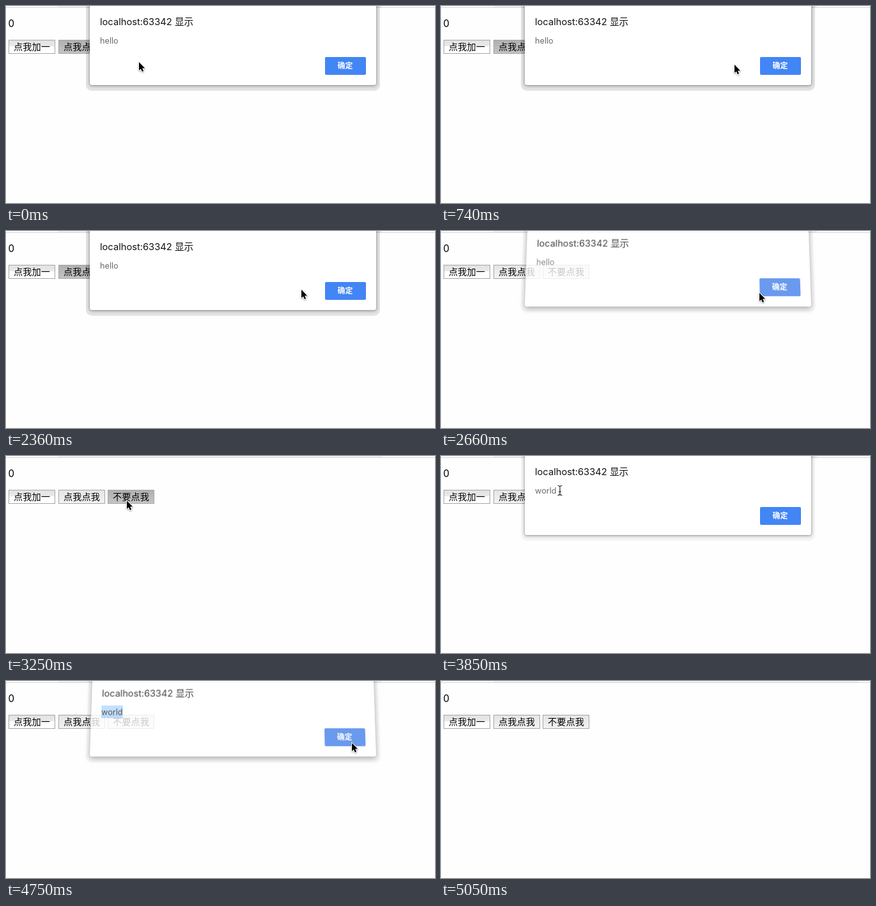
An HTML page for the animation above (5490 ms loop, 671 by 309 pixels).

```html
<!DOCTYPE html>
<html lang="zh-CN">
<head>
<meta charset="utf-8">
<title>Alert dialogs</title>
<style>
  html, body { margin: 0; width: 100%; height: 100%; overflow: hidden; background: #fefefe; }
  svg { position: absolute; left: 0; top: 0; overflow: visible; }
  text { font-family: "Noto Sans CJK SC", "Noto Sans CJK", sans-serif; }
  .latin { font-family: Inter, Roboto, sans-serif; }
  #dialog { position: absolute; left: 0; top: 0; width: 671px; height: 124px; transform-origin: 355px 124px; }
  #panel { position: absolute; left: 131px; top: -30px; width: 448px; height: 154px; border-radius: 3px;
    background: #fff; box-shadow: 0 0 1px rgba(0,0,0,.5), 0 1px 5px rgba(0,0,0,.42); }
  #ring { position: absolute; left: 125px; top: -30px; width: 460px; height: 163px; border-radius: 9px;
    background: rgba(0,0,0,.035); }
  .strong #ring { background: rgba(0,0,0,.1); }
  .moving #panel { box-shadow: 0 0 1px rgba(0,0,0,.4), 0 3px 8px rgba(0,0,0,.4); }
  .moving { opacity: .79; transform: translateY(-5.5px) perspective(300px) rotateX(2.6deg) scaleY(1.015); }
</style>
</head>
<body>
<svg width="671" height="309">
  <defs>
    <linearGradient id="split" x2="0" y2="1">
      <stop offset="0" stop-color="#e2e2e2"/><stop offset=".44" stop-color="#e9e9e9"/>
      <stop offset=".44" stop-color="#fefefe"/><stop offset="1" stop-color="#fff"/>
    </linearGradient>
    <linearGradient id="idle" x2="0" y2="1">
      <stop offset="0" stop-color="#e4e4e4"/><stop offset="1" stop-color="#f3f3f3"/>
    </linearGradient>
    <linearGradient id="down" x2="0" y2="1">
      <stop offset="0" stop-color="#afafaf"/><stop offset="1" stop-color="#c4c4c4"/>
    </linearGradient>
  </defs>
  <rect id="strip" x="82" height="2" fill="#f0f0f0"/>
  <rect y="2" width="671" height="1" fill="#d4d4d4"/>
  <text class="latin" x="3.6" y="33" font-size="15.2">0</text>
  <g id="buttons" font-size="14.2"></g>
</svg>

<div id="dialog">
  <div id="ring"></div>
  <div id="panel"></div>
  <svg width="671" height="124">
    <text class="latin" x="147" y="30" font-size="14.7" fill="#111">localhost:63342</text>
    <text x="264" y="30" font-size="14.6" fill="#111">显示</text>
    <rect id="mark" y="44" height="20" fill="#b3d7ff"/>
    <text id="message" class="latin" x="147" y="59" font-size="12.7"></text>
    <rect id="ok" x="499" y="80" width="64" height="28" rx="2"/>
    <text x="530.5" y="98.4" font-size="12" font-weight="700" fill="#fff" text-anchor="middle">确定</text>
  </svg>
</div>

<svg width="671" height="309">
  <path id="arrow" d="M0 0V13L2.9 10.4 4.9 15 7.2 14 5.2 9.4H9.2Z"
    stroke="#fff" stroke-width="2" stroke-linejoin="round" paint-order="stroke"
    style="filter:drop-shadow(0 1px 1px rgba(0,0,0,.35))"/>
  <g id="beam" fill="none">
    <path id="bar" stroke="#fff" stroke-width="2.4"
      d="M-3.5-7.5Q-.5-7.5 0-6Q.5-7.5 3.5-7.5M0-6V6M-3.5 7.5Q-.5 7.5 0 6Q.5 7.5 3.5 7.5M-2 2H2"/>
    <path id="barInk" stroke="#111" stroke-width="1.1"/>
  </g>
</svg>

<script>
const LOOP = 5490, STEP = 148.3, LEAD = 16;
const TEXT_LEFT = 147, TEXT_RIGHT = 181;
const DRAG_FROM = 27, DRAG_TO = 29, EXIT = 33;
const $ = id => document.getElementById(id);

// Pointer rests, in steps; it eases from one to the next.
const rests = [
  [0, 208, 88], [4, 515, 98], [8, 159, 57], [11, 148, 53], [12, 148, 53],
  [17, 498, 97], [18, 498, 97], [22, 189, 70], [24, 189, 70], [26, 186, 54],
  [DRAG_FROM, 182, 54], [DRAG_TO, TEXT_LEFT, 54], [31, 541, 97], [32, 541, 97], [EXIT, 640, 290]
];

// Each dialog is opened by a page button, which stays down until it closes.
const dialogs = [
  { message: 'hello', button: 1, open: -2, close: 18 },
  { message: 'world', button: 2, open: 23, close: 32 }
];

function set(el, attrs) {
  for (const name in attrs) el.setAttribute(name, attrs[name]);
}

function makeButton(label, i) {
  const x = 4 + Math.round(i * 77.6);
  const g = document.createElementNS('http://www.w3.org/2000/svg', 'g');
  g.innerHTML = `<rect x="${x + .5}" y="53.5" width="72" height="21" stroke="#a6a6a6"/>
    <text x="${x + 36.5}" y="69.3" text-anchor="middle">${label}</text>`;
  $('buttons').append(g);
  return g.firstChild;
}
const buttons = ['点我加一', '点我点我', '不要点我'].map(makeButton);
$('barInk').setAttribute('d', $('bar').getAttribute('d'));

function pointerAt(step) {
  const i = rests.findLastIndex(r => r[0] <= step);
  const [s0, x0, y0] = rests[i];
  const [s1, x1, y1] = rests[i + 1] || [s0 + 1, x0, y0];
  const u = (step - s0) / (s1 - s0);
  const k = u * u * (3 - 2 * u);
  return { x: x0 + (x1 - x0) * k, y: y0 + (y1 - y0) * k };
}

function selectionLeft(step, x) {
  if (step < DRAG_FROM || step > 32) return TEXT_RIGHT;
  return step < DRAG_TO ? Math.min(x, TEXT_RIGHT) : TEXT_LEFT;
}

function drawDialog(dialog, step, { x, y }) {
  const box = $('dialog');
  box.style.display = dialog ? '' : 'none';
  if (!dialog) return;
  const moving = step === dialog.open || step === dialog.close;
  box.className = moving ? 'moving' : dialog.button === 1 ? 'strong' : '';
  const left = selectionLeft(step, x);
  set($('mark'), { x: left, width: TEXT_RIGHT - left });
  $('message').textContent = dialog.message;
  set($('message'), { fill: left === TEXT_LEFT ? '#222' : '#6b6b6b' });
  const hover = x > 496 && x < 563 && y > 80 && y < 108;
  set($('ok'), { fill: hover ? '#407fe8' : '#4285f4' });
}

function drawPointer({ x, y }, step, dialog) {
  const overText = dialog && x > 143 && x < 200 && y > 44 && y < 61;
  const shape = step > EXIT ? '' : overText ? 'beam' : 'arrow';
  for (const id of ['arrow', 'beam']) {
    $(id).style.display = id === shape ? '' : 'none';
    set($(id), { transform: `translate(${Math.round(x)} ${Math.round(y)})` });
  }
}

function draw(t) {
  const step = Math.floor((t + LEAD) / STEP);
  const dialog = dialogs.find(d => step >= d.open && step <= d.close);
  const down = dialogs.find(d => step >= d.open - 1 && step < d.close);
  const pointer = pointerAt(step);
  buttons.forEach((b, i) => {
    const fill = down && i === down.button ? 'down' : i ? 'idle' : 'split';
    set(b, { fill: `url(#${fill})` });
  });
  set($('strip'), { width: step < EXIT ? 506 : 571 });
  drawDialog(dialog, step, pointer);
  drawPointer(pointer, step, dialog);
}

const start = performance.now();
function tick() {
  draw((performance.now() - start) % LOOP);
  requestAnimationFrame(tick);
}
tick();
</script>
</body>
</html>
```
